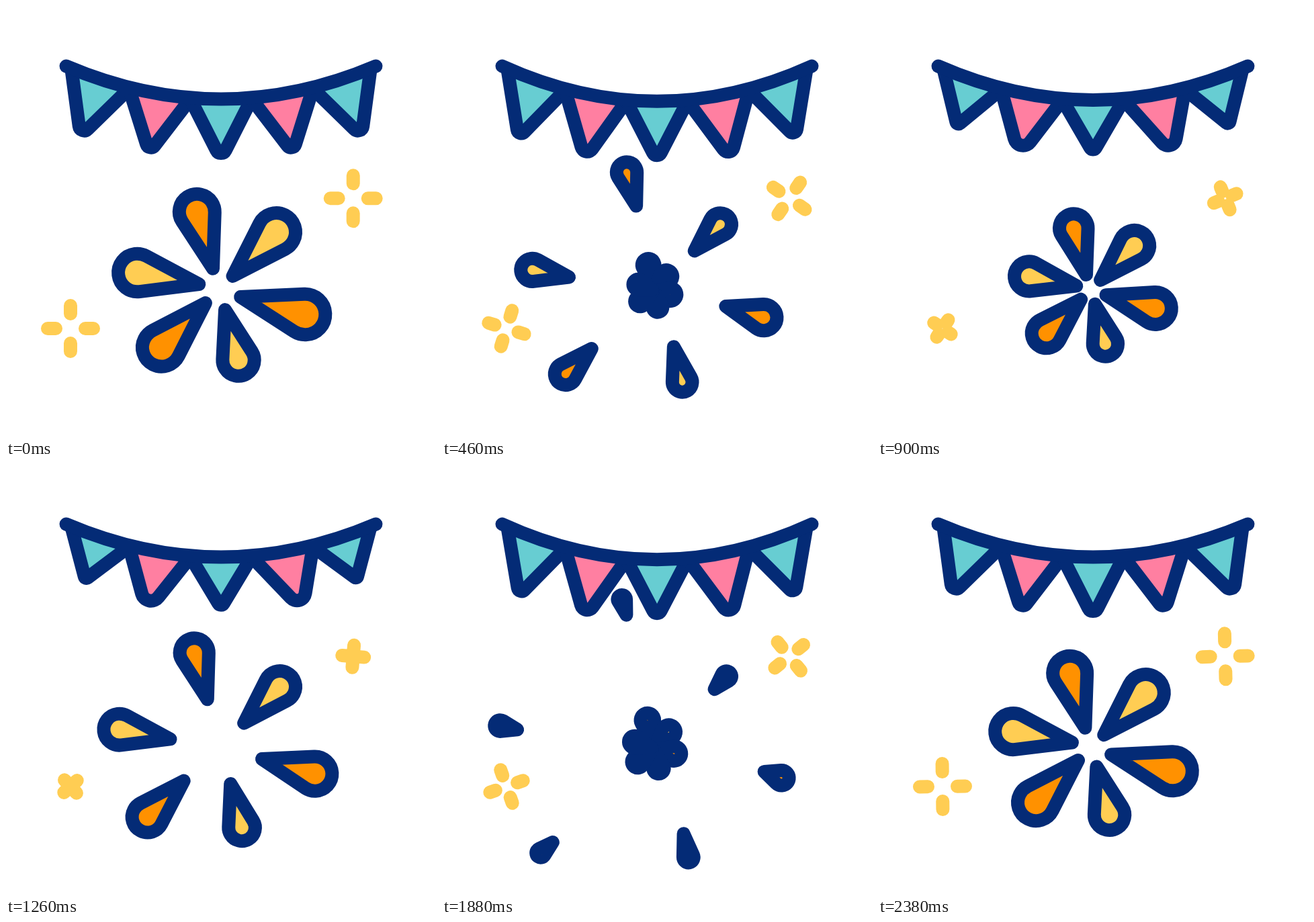
Animation of 640x640 px, one loop 2.4 s. Source, as an HTML page with a canvas:

```html
<!DOCTYPE html>
<html lang="en">
<head>
<meta charset="utf-8">
<title>Bunting and fireworks</title>
<style>
  html, body { margin: 0; width: 100%; height: 100%; overflow: hidden; background: #fff; }
  canvas { display: block; width: 100vmin; height: 100vmin; }
</style>
</head>
<body>
<canvas id="stage" width="640" height="640"></canvas>
<script>
const ctx = document.getElementById('stage').getContext('2d');
const LOOP = 2400;
const NAVY = '#042b76', TEAL = '#67cdd2', PINK = '#ff7fa1', ORANGE = '#ff9100', YELLOW = '#ffcd53';

const mix = (a, b, p) => a + (b - a) * p;
const mixAll = (a, b, p) => a.map((v, i) => mix(v, b[i], p));

// Each pose: head x, head y, head radius, tip x, tip y.
const HUB = [315, 423];
const drops = [
  { fill: ORANGE, seed: [309, 392, 8], full: [284.3, 306.5, 26.5, 308, 391], far: [271, 222, 10.3, 281, 257.3] },
  { fill: YELLOW, seed: [328, 408, 8], full: [402.5, 336.5, 28.5, 337.5, 402], far: [419.3, 320, 11.7, 392.3, 348.3] },
  { fill: ORANGE, seed: [331, 427, 8], full: [445, 459, 30.3, 349, 433], far: [493.5, 465.7, 15, 454, 453] },
  { fill: YELLOW, seed: [319, 442, 6], full: [346, 527, 23.7, 326, 452], far: [362.7, 574, 11, 353, 531] },
  { fill: ORANGE, seed: [300, 434, 6], full: [231.5, 508, 28.5, 297, 442], far: [163.5, 565, 11, 190.7, 539.3] },
  { fill: YELLOW, seed: [300, 416, 6], full: [195.5, 397, 28.3, 287.5, 414], far: [108, 391, 12.3, 146.5, 399] }
];
const BURST_PEAKS = [0, 1060, 2412];

// left/right: anchors on the rope; tip moves by "bend", and by "sag" per rope pixel.
const flags = [
  { fill: TEAL, left: 97.4, right: 184, tip: [110.8, 193.9], bend: [7.2, -22], sag: [0.3, 2.7], round: [7.5, 3] },
  { fill: PINK, left: 183, right: 275, tip: [213.1, 218.4], bend: [-3.6, 1.8], sag: [0.2, 2.8], round: [6.8, 14] },
  { fill: TEAL, left: 274, right: 366, tip: [320, 228.2], bend: [0, -14.1], sag: [0, 1.8], round: [7.5, 4.5] },
  { fill: PINK, left: 365, right: 457, tip: [426.9, 218.4], bend: [14.6, -0.9], sag: [-0.5, 2.9], round: [6.8, 12.5] },
  { fill: TEAL, left: 456, right: 542.6, tip: [529.2, 193.9], bend: [-7.1, -23], sag: [-0.3, 2.4], round: [7.5, 2.5] }
];

// 0 at the loop ends, 1 in the middle.
function swing(t) {
  const x = 1 - Math.abs(2 * t / LOOP - 1);
  return x * x * x * (x * (6 * x - 15) + 10);
}

function pen(color) {
  ctx.strokeStyle = color;
  ctx.lineWidth = 20;
  ctx.lineCap = ctx.lineJoin = 'round';
}

function drawBunting(t) {
  const sag = 4 * Math.pow(Math.sin(Math.PI * t / 1200) ** 2, 1.4);
  const depth = 2 * (49 + sag);
  const ropeY = x => {
    const s = (x - 89.5) / 461;
    return 89.5 + 2 * s * (1 - s) * depth;
  };
  const bend = swing(t);

  pen(NAVY);
  for (const f of flags) {
    const [x, y] = f.tip.map((v, i) => v + f.bend[i] * bend + f.sag[i] * sag);
    ctx.beginPath();
    ctx.moveTo(f.left, ropeY(f.left) + 1);
    ctx.arcTo(x, y, f.right, ropeY(f.right), mix(...f.round, bend));
    ctx.lineTo(f.right, ropeY(f.right) + 1);
    ctx.fillStyle = f.fill;
    ctx.fill();
    ctx.stroke();
  }
  ctx.beginPath();
  ctx.moveTo(89.5, 89.5);
  ctx.quadraticCurveTo(320, 89.5 + depth, 550.5, 89.5);
  ctx.stroke();
}

function drawDrop([hx, hy, r, tx, ty], fill) {
  const axis = Math.atan2(ty - hy, tx - hx);
  const half = Math.acos(Math.min(1, r / Math.hypot(tx - hx, ty - hy)));
  ctx.beginPath();
  ctx.arc(hx, hy, r, axis + half, axis - half + 2 * Math.PI);
  ctx.lineTo(tx, ty);
  ctx.closePath();
  ctx.fillStyle = fill;
  ctx.fill();
  ctx.stroke();
}

// Slow start, then steady growth up to the peak at u = 0.
const growth = u => u > -400 ? 1 + u * 0.001775 : 0.34 * Math.exp((u + 400) / 200) - 0.05;

function drawBurst(u) {
  if (u < -860 || u > 868) return;
  pen(NAVY);
  for (const d of drops) {
    const pose = u < 0
      ? mixAll([...d.seed, ...HUB], d.full, growth(u))
      : mixAll(d.full, d.far, u / 660);
    drawDrop(pose, d.fill);
  }
}

function drawSparkle(x, y, angle, inner, outer) {
  pen(YELLOW);
  ctx.save();
  ctx.translate(x, y);
  ctx.rotate(angle);
  ctx.beginPath();
  for (let i = 0; i < 4; i++) {
    ctx.moveTo(0, -inner);
    ctx.lineTo(0, -outer);
    ctx.rotate(Math.PI / 2);
  }
  ctx.stroke();
  ctx.restore();
}

function draw(t) {
  ctx.fillStyle = '#fff';
  ctx.fillRect(0, 0, 640, 640);
  const turn = Math.PI * t / LOOP;
  const s = swing(t);
  drawSparkle(516.7, 286.3, turn, 22 - 12 * s, 34 - 17.5 * s);
  drawSparkle(96, 480, turn / 2, 22 - 13 * s, 34 - 20.8 * s);
  for (const peak of BURST_PEAKS) drawBurst(t - peak);
  drawBunting(t);
}

const start = performance.now();
function tick() {
  draw((performance.now() - start) % LOOP);
  requestAnimationFrame(tick);
}
tick();
</script>
</body>
</html>
```
